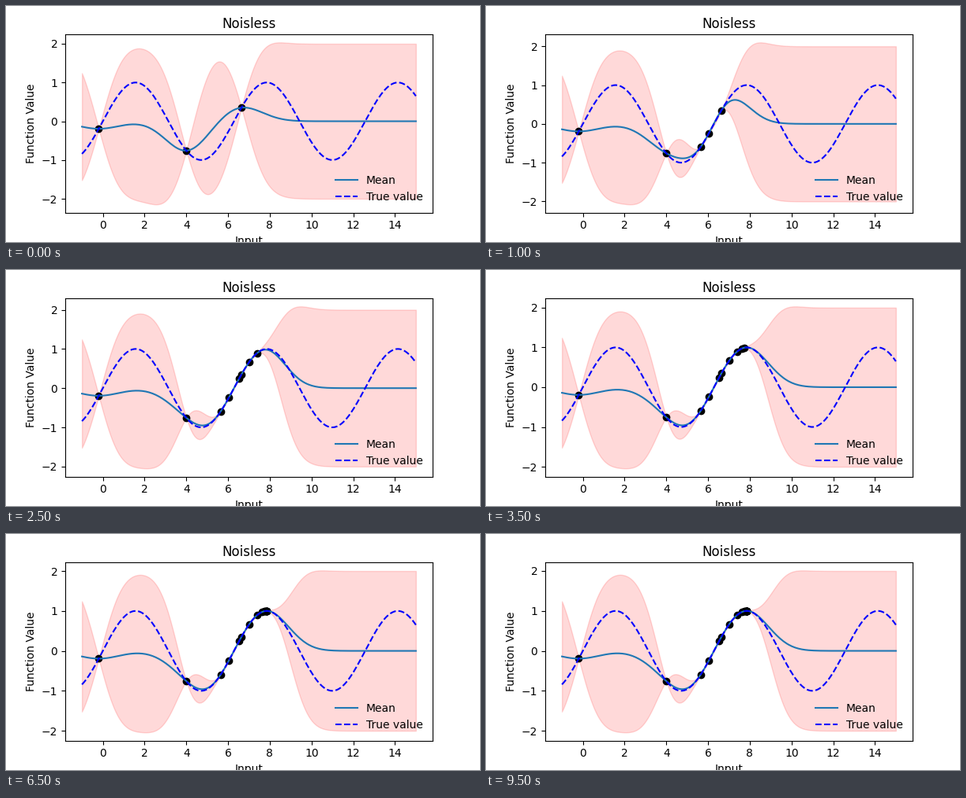
Animation, 600 px wide and 300 px high, one loop 10000 ms. Source, as a matplotlib script:

```python
import numpy as np
import matplotlib.pyplot as plt
from matplotlib.animation import FuncAnimation

FRAMES, INTERVAL = 20, 500
STEP, JITTER = 0.5, 5e-5

plt.rcParams["font.family"] = "DejaVu Sans"


def kernel(a, b):
    return np.exp(-0.5 * (a[:, None] - b[None, :]) ** 2)


def posterior(x, y, grid):
    """Mean and standard deviation of a zero-mean Gaussian process."""
    chol = np.linalg.cholesky(kernel(x, x) + JITTER * np.eye(len(x)))
    proj = np.linalg.solve(chol, kernel(x, grid))
    mean = proj.T @ np.linalg.solve(chol, y)
    var = 1 - np.sum(proj ** 2, axis=0)
    return mean, np.sqrt(np.maximum(var, 0))


def ascent(start, count):
    """Gradient ascent on sin(x)."""
    path = [start]
    while len(path) < count:
        path.append(path[-1] + STEP * np.cos(path[-1]))
    return path


grid = np.linspace(-1, 15, 200)
samples = np.array([-0.195, 4.0, 6.64] + ascent(5.64, FRAMES - 1))

fig, ax = plt.subplots(figsize=(6, 3), dpi=100)
fig.subplots_adjust(left=0.125, right=0.9, bottom=0.125, top=0.88)


def draw(frame):
    x = samples[:3 + frame]
    y = np.sin(x)
    mean, std = posterior(x, y, grid)
    ax.clear()
    ax.fill_between(grid, mean - 2 * std, mean + 2 * std, color="red", alpha=0.15)
    ax.plot(grid, mean, label="Mean")
    ax.plot(grid, np.sin(grid), "b--", label="True value")
    ax.scatter(x, y, color="black")
    ax.set_title("Noisless")
    ax.set_xlabel("Input")
    ax.set_ylabel("Function Value")
    ax.legend(loc="lower right", frameon=False)


anim = FuncAnimation(fig, draw, frames=FRAMES, init_func=lambda: None,
                     interval=INTERVAL, repeat=True, repeat_delay=0)
plt.show()
```
